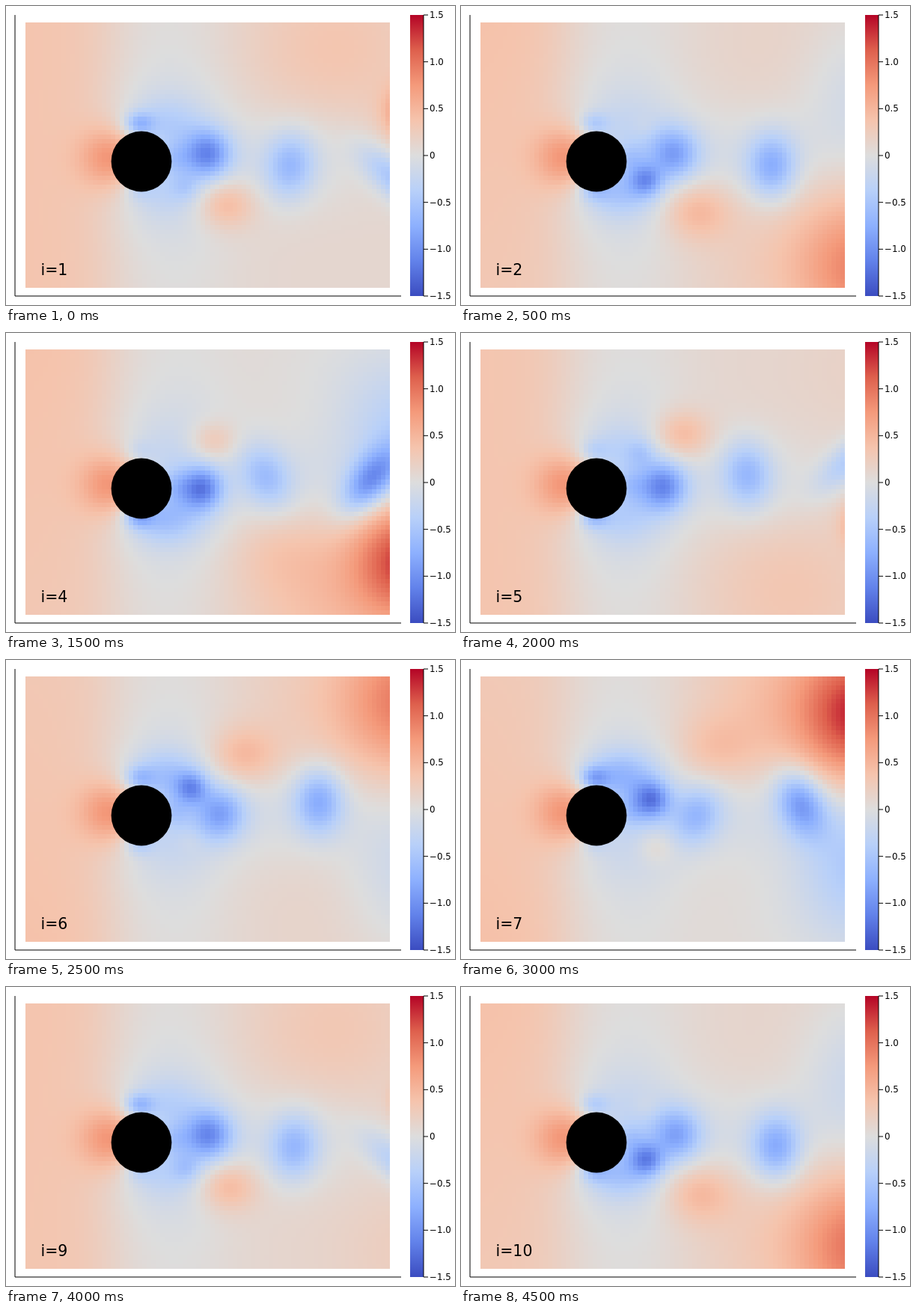
An HTML page with a canvas for the animation above (5 s loop, 600 by 400 pixels).

```html
<!DOCTYPE html>
<html lang="en">
<head>
<meta charset="utf-8">
<title>Pressure field behind a cylinder</title>
<style>
html, body { margin: 0; width: 100%; height: 100%; overflow: hidden; background: #fff; }
#stage { position: relative; width: 600px; height: 400px; }
canvas, svg { position: absolute; left: 0; top: 0; display: block; }
text { font-family: "DejaVu Sans", sans-serif; }
</style>
</head>
<body>
<div id="stage">
<canvas id="heat" width="600" height="400"></canvas>
<svg width="600" height="400" viewBox="0 0 600 400">
  <defs><linearGradient id="ramp" x1="0" y1="1" x2="0" y2="0"></linearGradient></defs>
  <path d="M12 12V388H528" fill="none" stroke="#000" stroke-width="1"/>
  <circle cx="181" cy="208" r="40.4"/>
  <text id="label" x="46.5" y="360" font-size="20.5"></text>
  <rect x="540" y="12" width="18" height="376" fill="url(#ramp)"/>
  <g id="scale" font-size="11.8"></g>
</svg>
</div>
<script>
const STEP = 500, COUNT = 10;
const LEFT = 26, TOP = 22, W = 487, H = 355, COLS = 81, ROWS = 59;
const AXIS = 201.5;   // mirror line of the wake
const RATE = 1.02;    // phase per step; 8 phases make one shedding cycle
const SVG = "http://www.w3.org/2000/svg";

const stops = ["3b4cc0", "6282ea", "8db0fe", "b8d0f9", "dddddd", "f5c4ad", "f49a7b", "de604d", "b40426"];
const rgb = stops.map(h => [0, 2, 4].map(i => parseInt(h.slice(i, i + 2), 16)));

const { PI, min, max, exp, sin, cos, floor, round } = Math;
const bell = (v, mid, width) => exp(-(((v - mid) / width) ** 2));
const wave = (p, peak) => cos((p - peak) * PI / 4);
const sigmoid = v => 1 / (1 + exp(-v));
const blob = (x, y, rx, ry, a, shear = 0) => ({ x, y, rx, ry, a, shear });
const mirror = b => ({ ...b, y: 2 * AXIS - b.y, shear: -b.shear });

// Forms behind the cylinder, lingers, then drifts downstream.
function vortex(age) {
  const drift = .5 * Math.log(1 + exp((age - 5) / .5));
  const x = 240 + 7 * age + 28 * drift;
  const y = 205 + 38 * bell(age, 0, 1.9) + 10 * bell(age, 8.8, 2.2) - 9 * max(0, age - 10) ** 2;
  const fade = min(1, .3 + .55 * age, .65 * (13 - age));
  const shear = -.2 * bell(age, 6.8, 1) - .3 * max(0, age - 9.5);
  return blob(x, y, min(12 + 2.4 * age, 23), min(12 + 2.5 * age, 31),
    -fade * (.75 + .22 * wave(age, 3)), shear);
}

// Pressure ridge between two vortices.
function crest(age) {
  return blob(245 + 13 * age + age * age, 241 + 8 * age, 12 + 5 * age, 11 + 4 * age,
    .47 * bell(age, 3.2, 2.4));
}

// High and low pressure that build up at the outlet as a vortex leaves.
function surge(age) {
  const r = 56 * (1 - (age / 4.4) ** 5);
  return blob(535, 355 - 6 * age * age, r, 1.2 * r, 1.15 * sin(PI * age / 5));
}

function suction(age) {
  return blob(530, 110 + 12 * age, 55, 75, -.56 * sin(PI * (age / 4) ** 1.4));
}

const shed = [
  { form: vortex, lead: 0, life: 13 },
  { form: crest, lead: 3, life: 7 },
  { form: surge, lead: 0, life: 4.4 },
  { form: suction, lead: 0, life: 4 }
];

function blobsAt(phase) {
  const blobs = [
    blob(145, 203, 30, 29, .7),
    blob(218, AXIS, 54, 68, -.29),
    blob(226, 204, 14, 14, -.22),
    blob(380, AXIS, 80, 45, -.2)
  ];
  const add = (b, flip) => blobs.push(flip ? mirror(b) : b);
  // One vortex is shed every half cycle, on alternating sides.
  const half = floor(phase / 4);
  for (let n = half - 4; n <= half + 1; n++) {
    for (const { form, lead, life } of shed) {
      const age = phase - 4 * n + lead;
      if (age >= 0 && age < life) add(form(age), n % 2);
    }
  }
  // Shear layers and the far field pulse on both sides in turn.
  for (const side of [0, 1]) {
    const p = phase + 4 * side;
    add(blob(177, 158, 14, 11, -.42 - .24 * wave(p, 7)), side);
    add(blob(212, 155, 34, 23, -.5 * ((1 + wave(p, 6.2)) / 2) ** 1.5), side);
    add(blob(440, 345, 90, 85, .13 + .23 * wave(p, 2.7)), side);
  }
  return blobs;
}

function pressure(x, y, phase, blobs) {
  const lean = .05 * wave(phase, 2) * (AXIS - y) / 180;
  let v = (.36 + lean) * sigmoid((142 - x) / 24) + .1 * sigmoid((x - 285) / 25);
  for (const b of blobs) {
    const dy = y - b.y, dx = x - b.x - b.shear * dy;
    v += b.a * exp(-.5 * ((dx / b.rx) ** 2 + (dy / b.ry) ** 2));
  }
  return v;
}

function colour(v) {
  const t = min(7.999, max(0, (v + 1.5) / 3 * 8)), i = floor(t);
  return `rgb(${rgb[i].map((c, j) => round(c + (rgb[i + 1][j] - c) * (t - i)))})`;
}

const ctx = document.getElementById("heat").getContext("2d");
const label = document.getElementById("label");
const edgeX = c => LEFT + round(c * W / COLS);
const edgeY = r => TOP + round(r * H / ROWS);

function draw(step) {
  const phase = step * RATE, blobs = blobsAt(phase);
  for (let r = 0; r < ROWS; r++) {
    for (let c = 0; c < COLS; c++) {
      const x = edgeX(c), y = edgeY(r), w = edgeX(c + 1) - x, h = edgeY(r + 1) - y;
      ctx.fillStyle = colour(pressure(x + w / 2, y + h / 2, phase, blobs));
      ctx.fillRect(x, y, w, h);
    }
  }
  label.textContent = "i=" + (step + 1);
}

function make(parent, tag, attrs, text) {
  const el = document.createElementNS(SVG, tag);
  for (const k in attrs) el.setAttribute(k, attrs[k]);
  if (text) el.textContent = text;
  parent.appendChild(el);
}

stops.forEach((h, i) =>
  make(document.getElementById("ramp"), "stop", { offset: i / 8, "stop-color": "#" + h }));

const scale = document.getElementById("scale");
make(scale, "path", { d: "M558 12V388", stroke: "#000", "stroke-width": 1 });
for (let i = -3; i <= 3; i++) {
  const y = 200 - i * 188 / 3;
  make(scale, "path", { d: `M558 ${y}h6`, stroke: "#000", "stroke-width": 1 });
  make(scale, "text", { x: 566, y: y + 4 }, i ? (i < 0 ? "\u2212" : "") + Math.abs(i / 2).toFixed(1) : "0");
}

let shown = -1;
const start = performance.now();
function tick() {
  const step = floor((performance.now() - start) / STEP) % COUNT;
  if (step !== shown) draw(shown = step);
  requestAnimationFrame(tick);
}
tick();
</script>
</body>
</html>
```
